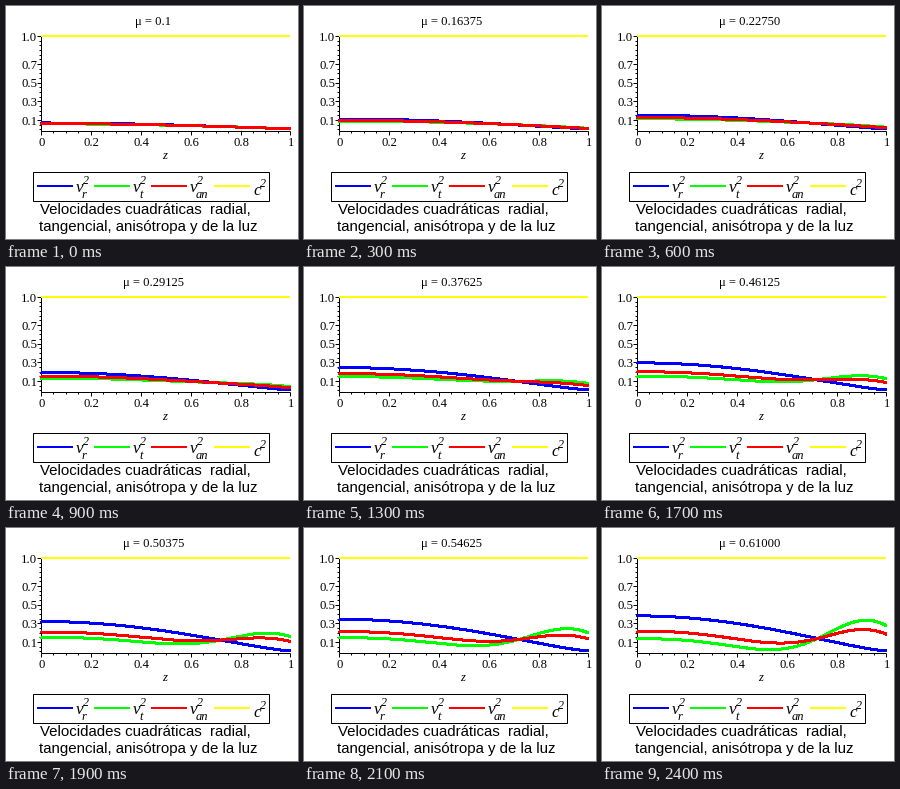
These frames come from a looping animation (292x233 px, 2.5 s). A matplotlib script:

```python
import numpy as np
import matplotlib.pyplot as plt
from matplotlib.animation import FuncAnimation
from matplotlib.patches import Rectangle

W, H, DPI = 292, 233, 100
PX = 72 / DPI
FRAMES, STEP = 25, 100
X0, X1, Y0, Y1 = 35, 284.4, 123.3, 30
AXIS_Y = 124.5
BLUE, GREEN, RED, YELLOW = "#0000ff", "#00ff00", "#ff0000", "#ffff00"

fig = plt.figure(figsize=(W / DPI, H / DPI), dpi=DPI, facecolor="white")
ax = fig.add_axes([0, 0, 1, 1])
ax.set(xlim=(0, W), ylim=(H, 0))
ax.axis("off")


def sx(z):
    return X0 + (X1 - X0) * z


def sy(v):
    return Y0 + (Y1 - Y0) * v


def label(x, y, s, size, ha="center", font="Liberation Serif", style="normal"):
    return ax.text(x, y, s, fontsize=size * PX, ha=ha, va="baseline",
                   family=font, style=style, color="black")


def rule(xs, ys):
    ax.plot(xs, ys, color="black", lw=PX, solid_capstyle="butt", snap=True)


def stroke(xs, ys, color):
    return ax.plot(xs, ys, color=color, lw=2 * PX, solid_capstyle="butt",
                   antialiased=False)[0]


z = np.linspace(0, 1, 150)


def radial(mu):
    peak = 0.69 * mu - 0.11 * mu**2
    return 0.005 + (peak - 0.005) * (1 - z**2) ** (1.25 + 0.25 * mu)


def tangential(mu):
    wave = -(0.2 + 1.3 * z) * np.sin(np.pi * (z / 0.725) ** 1.8)
    return (0.66 * mu * (1 - z**2) + mu**2 * (1.1 * z**2 - 0.717)
            + mu**4 * wave)


# Axes and ticks
rule([X0, X0], [Y1, AXIS_Y])
rule([X0, X1], [AXIS_Y, AXIS_Y])
for k in range(21):
    t = k / 20
    major_x = k % 4 == 0
    major_y = k in (2, 6, 10, 14, 20)
    rule([sx(t)] * 2, [AXIS_Y, AXIS_Y + (4 if major_x else 2)])
    rule([X0 - (4 if major_y else 2), X0], [sy(t)] * 2)
    if major_x:
        label(sx(t) + 0.5, 140.3, f"{t:g}", 12.6)
    if major_y:
        label(31.3, sy(t) + 4.6, f"{t:.1f}", 12.8, "right")
label(158.5, 153, "z", 12.6, style="italic")

# Legend
ax.add_patch(Rectangle((27.5, 166.5), 236, 29, fill=False, ec="black",
                       lw=PX, snap=False))
for x, color, name, sub, drop in [(31, BLUE, "v", "r", 0),
                                  (88, GREEN, "v", "t", 0),
                                  (145, RED, "v", "an", 0),
                                  (208, YELLOW, "c", "", 3)]:
    stroke([x, x + 36], [180, 180], color)
    label(x + 39, 186 + drop, name, 17, "left", style="italic")
    label(x + 46, 178 + drop, "2", 12, "left", style="italic")
    label(x + 45, 191.5, sub, 12.5, "left", style="italic")

# Caption
label(34, 207.5, "Velocidades cuadráticas  radial,", 15.05, "left", "Liberation Sans")
label(33, 224.5, "tangencial, anisótropa y de la luz", 15.05, "left", "Liberation Sans")

title = label(147.3, 19.3, "", 12.6)
curves = [stroke([], [], c) for c in (BLUE, GREEN, RED)]
stroke([X0, X1], [Y1, Y1], YELLOW)


def update(i):
    mu = 0.1 + 0.02125 * i
    vr, vt = radial(mu), tangential(mu)
    for line, v in zip(curves, (vr, vt, (vr + 2 * vt) / 3)):
        line.set_data(sx(z), sy(v))
    title.set_text("μ = " + (f"{mu:.5f}" if i else "0.1"))
    return [*curves, title]


anim = FuncAnimation(fig, update, frames=FRAMES, interval=STEP,
                     repeat=True, repeat_delay=0, blit=False)
plt.show()
```
